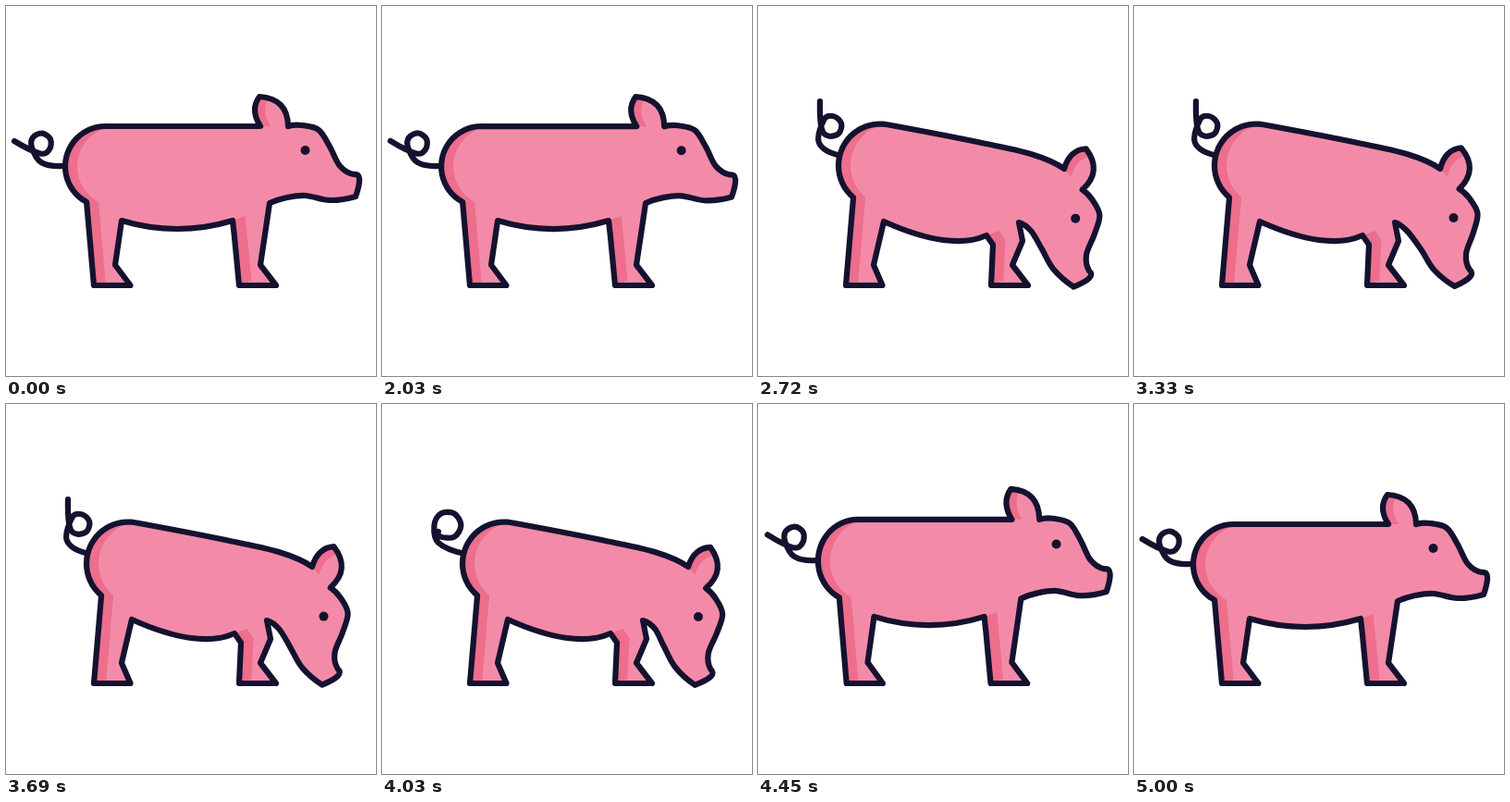
Recreate the animation shown at these times as an HTML page. Size 400 px wide and 400 px high, loop 5030 ms.

```html
<!DOCTYPE html>
<html lang="en">
<head>
<meta charset="utf-8">
<title>Grazing pig</title>
<style>
  html, body { margin: 0; width: 100%; height: 100%; overflow: hidden; background: #fff; }
  svg { display: block; width: 100%; height: 100%; }
  .line { fill: none; stroke: #14122f; stroke-width: 6.2; stroke-linecap: round; stroke-linejoin: round; }
  .skin { fill: #f38ba8; }
  .shade { fill: #ed6e8d; }
</style>
</head>
<body>
<svg viewBox="0 0 400 400">
  <clipPath id="inside"><path id="clip"/></clipPath>
  <path id="tail" class="line"/>
  <path id="skin" class="skin"/>
  <g class="shade" clip-path="url(#inside)">
    <path id="rump"/><path id="leg"/><path id="ear"/>
  </g>
  <path id="outline" class="line"/>
  <circle id="eye" r="5" fill="#14122f"/>
</svg>
<script>
const LOOP = 5030;
const GROUND = 302;
const rad = deg => deg * Math.PI / 180;
const lerp = (a, b, p) => a + (b - a) * p;
const mix = (a, b, p) => a.map((v, i) => lerp(v, b[i], p));
const polar = ([x, y], r, deg) => [x + r * Math.cos(rad(deg)), y + r * Math.sin(rad(deg))];
const shift = (pts, dx, dy) => pts.map(([x, y]) => [x + dx, y + dy]);

// Each joint: standing, then grazing
const joints = {
  neck: [[275, 130], [331, 176]],
  withers: [[240, 130], [295, 160]],
  back: [[190, 130], [235, 146.5]],
  hip: [[107.5, 173.5], [132, 172.5]],
  ankle: [[118, 280], [125, 280]],
  groin: [[125, 232], [136, 233]],
  belly: [[185, 241], [200, 253]],
  elbow: [[245, 232], [247, 248]],
  knee: [[247, 250], [254, 258]],
  shin: [[281, 240], [286, 254]],
  chest: [[285, 213], [282, 234]],
  throat: [[304, 207], [295, 243]]
};

// The rigid head, relative to the neck joint it turns about
const head = {
  jaw: [[49, 75], [75, 80], [103, 76]],
  snout: [[107, 57], [101, 52]],
  face: [[86, 43], [75, 22], [63, 4], [45, -1], [30, 0]],
  ear: [[22, -23], [-1, -32]],
  earBack: [[-6, -17]],
  eye: [[48.5, 26]]
};

// Tail: tip, loop centre, hook, base, loop radius, angle where the loop starts
const tailUp = [9, 146, 38, 148.5, 38, 169, 62, 173, 11, 95];
const tailDown = [67, 103, 79.5, 130, 66, 148, 90, 162, 11, 165];
const tailCurl = [61, 138, 71, 131, 61, 150, 90, 162, 14.5, 120];

const IN = 50.5, OUT = 46.5;
const chew = Array.from({ length: 7 }, (_, i) => [2620 + 240 * i, [i % 2 ? OUT : IN]]);
const tracks = {
  bend: [[2010, [0]], [2560, [1]], [4050, [1]], [4410, [0]]],
  nod: [[2010, [0]], ...chew, [4420, [0]]],
  tail: [[2010, tailUp], [2620, tailDown], [3700, tailDown], [4020, tailCurl], [4420, tailUp]],
  stretch: [[4200, [0]], [4440, [1.05]], [4700, [-0.3]], [5000, [0]]],
  lean: [[4450, [0]], [4690, [6]], [5000, [0]]]
};

function sample(keys, t) {
  const i = keys.findIndex(k => k[0] > t);
  if (i === 0) return keys[0][1];
  if (i < 0) return keys[keys.length - 1][1];
  const [t0, a] = keys[i - 1], [t1, b] = keys[i];
  return mix(a, b, (1 - Math.cos(Math.PI * (t - t0) / (t1 - t0))) / 2);
}

const fmt = p => p[0].toFixed(2) + ' ' + p[1].toFixed(2);
const lines = pts => pts.map(p => 'L' + fmt(p)).join('');
const shape = pts => 'M' + lines(pts).slice(1) + 'Z';

// Smooth curve through the points; the ends continue as a parabola
function curve(pts) {
  const beyond = (a, b, c) => [0, 1].map(k => 3 * a[k] - 3 * b[k] + c[k]);
  const n = pts.length;
  const all = [beyond(...pts.slice(0, 3)), ...pts, beyond(...pts.slice(-3).reverse())];
  let d = '';
  for (let i = 1; i < n; i++) {
    const [a, b, c, e] = all.slice(i - 1, i + 3);
    const c1 = [0, 1].map(k => b[k] + (c[k] - a[k]) / 6);
    const c2 = [0, 1].map(k => c[k] - (e[k] - b[k]) / 6);
    d += 'C' + [c1, c2, c].map(fmt).join(' ');
  }
  return d;
}

const arc = (centre, r, from, sweep, steps) =>
  Array.from({ length: steps + 1 }, (_, i) => polar(centre, r, from + sweep * i / steps));

const el = id => document.getElementById(id);
const setPath = (id, d) => el(id).setAttribute('d', d);

function draw(t) {
  const [bend, nod, stretch, lean] = ['bend', 'nod', 'stretch', 'lean'].map(k => sample(tracks[k], t)[0]);
  const grow = ([x, y]) => [lerp(x, 192, 0.007 * stretch), lerp(GROUND, y, 1 + 0.029 * stretch)];

  const raw = {}, j = {}, h = {};
  for (const k in joints) {
    raw[k] = mix(...joints[k], bend);
    j[k] = grow(raw[k]);
  }
  const cos = Math.cos(rad(nod)), sin = Math.sin(rad(nod));
  for (const k in head) {
    h[k] = head[k].map(([x, y]) => grow([raw.neck[0] + x * cos - y * sin, raw.neck[1] + x * sin + y * cos]));
  }

  const rump = arc(raw.hip, 43.5 + 1.5 * bend, -90 + 12 * bend, -152, 24).map(grow);
  const [heel, toe, frontHeel, frontToe] = [95, 134.5, 252, 292].map(x => grow([x, GROUND]));
  const frontAnkle = grow([275, 280]);
  const snoutTip = h.jaw[2], nose = h.snout[1], earFront = h.face[4], earTip = h.ear[1];
  const earBack = [earTip, ...h.earBack, j.neck];

  const body = 'M' + lines(rump).slice(1) + lines([heel, toe, j.ankle, j.groin]) +
    curve([j.groin, j.belly, j.elbow]) +
    lines([j.knee, frontHeel, frontToe, frontAnkle, j.shin, j.chest]) +
    curve([j.chest, j.throat, ...h.jaw]) +
    curve([snoutTip, ...h.snout]) +
    curve([nose, ...h.face]) +
    curve([earFront, ...h.ear]) +
    curve(earBack) +
    curve([j.neck, j.withers, j.back, rump[0]]) + 'Z';
  for (const id of ['clip', 'skin', 'outline']) setPath(id, body);

  // Each shadow is an edge and its own shifted copy
  const shadow = (edge, dx, dy) => shape([...edge, ...shift(edge, dx, dy).reverse()]);
  setPath('rump', shadow([...rump, heel], 13, 0));
  setPath('leg', shadow([j.elbow, j.knee, frontHeel], 13.5, -5));
  const [ex, ey] = [0, 1].map(k => 0.37 * (earFront[k] - j.neck[k]));
  const inner = shift(earBack, ex, ey).reverse();
  setPath('ear', 'M' + fmt(earTip) + curve(earBack) + 'L' + fmt(inner[0]) + curve(inner) + 'Z');

  const [tx, ty, cx, cy, hx, hy, bx, by, r, angle] = sample(tracks.tail, t);
  const tail = [[tx, ty], ...arc([cx, cy], r, angle, -300, 5), [hx, hy], [bx, by]]
    .map(([x, y]) => grow([x - lean * (62 - x) / 54, y]));
  setPath('tail', 'M' + fmt(tail[0]) + curve(tail));

  el('eye').setAttribute('cx', h.eye[0][0]);
  el('eye').setAttribute('cy', h.eye[0][1]);
}

const start = performance.now();
function tick() {
  draw((performance.now() - start) % LOOP);
  requestAnimationFrame(tick);
}
tick();
</script>
</body>
</html>
```
